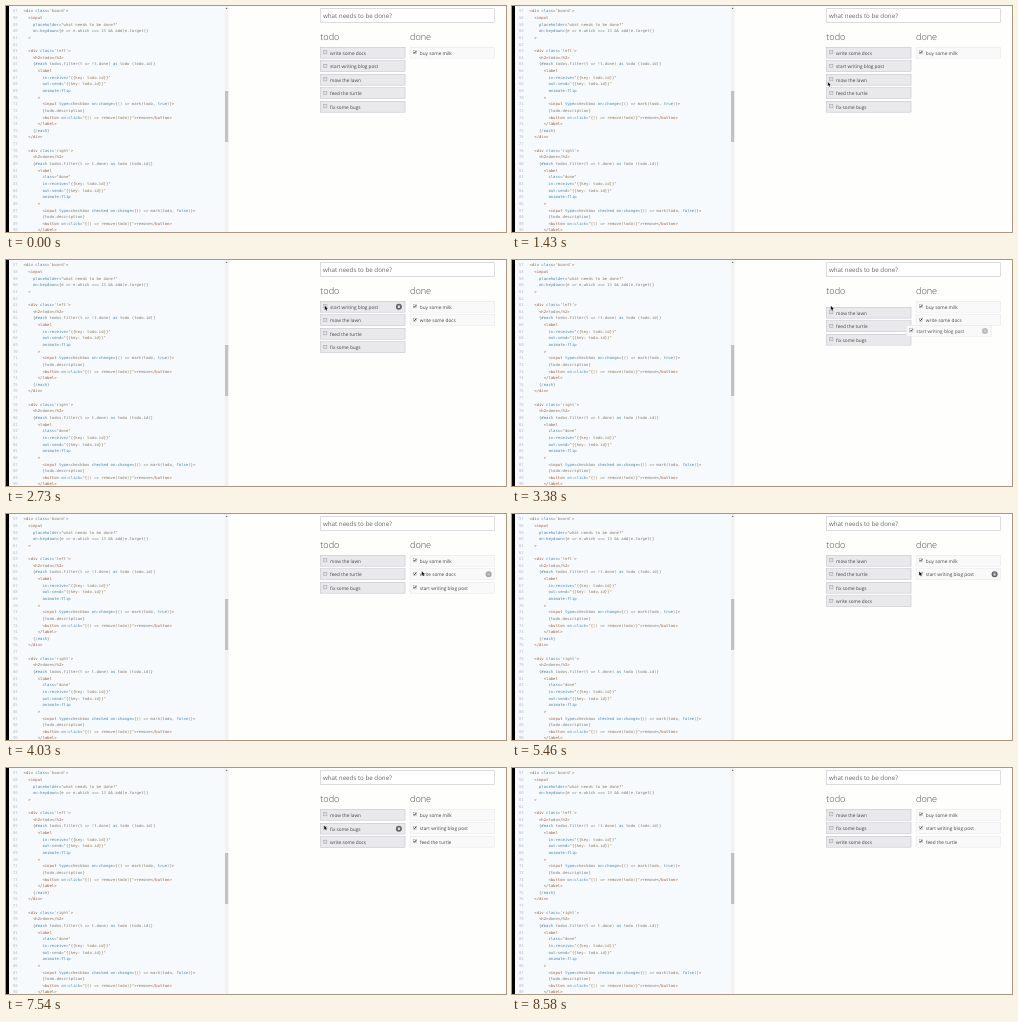
Animation, 500 px wide and 226 px high, one loop 9360 ms. Source, as an HTML page with a canvas:

```html
<!DOCTYPE html>
<html lang="en">
<head>
<meta charset="utf-8">
<title>Todo transitions</title>
<style>
html, body { margin: 0; width: 100%; height: 100%; overflow: hidden; background: #fefefd; }
canvas { display: block; width: 500px; height: 226px; }
</style>
</head>
<body>
<canvas id="stage"></canvas>
<script>
const W = 500, H = 226, LOOP = 9360;
const FLIP = 760, FADE = 345;
const canvas = document.getElementById('stage');
const ctx = canvas.getContext('2d');
const dpr = window.devicePixelRatio || 1;
canvas.width = W * dpr;
canvas.height = H * dpr;
ctx.scale(dpr, dpr);
ctx.textBaseline = 'alphabetic';
ctx.textRendering = 'geometricPrecision';

const SANS = '"Open Sans", "Noto Sans", sans-serif';
const MONO = '"DejaVu Sans Mono", "Noto Sans Mono", monospace';

const code = `<div class='board'>
  <input
    placeholder="what needs to be done?"
    on:keydown={e => e.which === 13 && add(e.target)}
  >

  <div class='left'>
    <h2>todo</h2>
    {#each todos.filter(t => !t.done) as todo (todo.id)}
      <label
        in:receive="{{key: todo.id}}"
        out:send="{{key: todo.id}}"
        animate:flip
      >
        <input type=checkbox on:change={() => mark(todo, true)}>
        {todo.description}
        <button on:click="{() => remove(todo)}">remove</button>
      </label>
    {/each}
  </div>

  <div class='right'>
    <h2>done</h2>
    {#each todos.filter(t => t.done) as todo (todo.id)}
      <label
        class="done"
        in:receive="{{key: todo.id}}"
        out:send="{{key: todo.id}}"
        animate:flip
      >
        <input type=checkbox checked on:change={() => mark(todo, false)}>
        {todo.description}
        <button on:click="{() => remove(todo)}">remove</button>
      </label>`.split('\n');

const palette = {
  str: 'hsl(36,26%,46%)',
  op: 'hsl(40,7%,47%)',
  tag: 'hsl(19,45%,43%)',
  attr: 'hsl(204,42%,48%)',
  num: 'hsl(102,20%,50%)'
};
const token = /(?<str>"[^"]*"|'[^']*')|(?<op>=>|===|&&)|(?<tag><\/?\w+|>)|(?<attr>[\w:]+(?==)|animate:flip|[#\/]each|\b(?:as|true|false|checked)\b)|(?<num>\b13\b)|\w+|\s+|./g;

const names = {
  docs: 'write some docs',
  start: 'start writing blog post',
  mow: 'mow the lawn',
  feed: 'feed the turtle',
  fix: 'fix some bugs',
  milk: 'buy some milk'
};

// Each move sends one item to the end of the other list.
const moves = [
  { at: 2040, id: 'docs', to: 1 },
  { at: 3200, id: 'start', to: 1 },
  { at: 4750, id: 'docs', to: 0 },
  { at: 7020, id: 'feed', to: 1 }
];
const states = [[['docs', 'start', 'mow', 'feed', 'fix'], ['milk']]];
for (const m of moves) {
  const next = states[states.length - 1].map(list => list.filter(id => id !== m.id));
  next[m.to].push(m.id);
  states.push(next);
}

const hovers = [
  ['docs', 1620, 2040], ['start', 2380, 3200], ['mow', 3380, 3500],
  ['docs', 3930, 4750], ['start', 5000, 5860], ['feed', 6420, 7020],
  ['fix', 7300, 7900]
];

// Pointer tip: time, x, y
const path = [
  [780, 300, 236], [1650, 318.8, 45.8], [3420, 318.8, 45.8], [3980, 415.8, 57.2],
  [4250, 415.8, 57.2], [4560, 407.2, 57.4], [5700, 407.2, 57.4],
  [6450, 318.2, 57.4], [7800, 318.2, 57.4], [8500, 300, 236]
];

const clamp = v => Math.max(0, Math.min(1, v));
const mix = (a, b, p) => a + (b - a) * p;
const cubicOut = p => 1 - (1 - clamp(p)) ** 3;
const smooth = p => p * p * (3 - 2 * p);

function text(str, x, y, size, color, font = SANS, weight = 400) {
  ctx.font = `${weight} ${size}px ${font}`;
  ctx.fillStyle = color;
  ctx.fillText(str, x, y);
}

function rect(x, y, w, h, color) {
  ctx.fillStyle = color;
  ctx.fillRect(x, y, w, h);
}

function box(x, y, w, h, fill, line, width = 0.35) {
  rect(x, y, w, h, fill);
  ctx.strokeStyle = line;
  ctx.lineWidth = width;
  ctx.strokeRect(x + width / 2, y + width / 2, w - width, h - width);
}

function drawEditor() {
  rect(0, 0, 222.5, H, '#f6fafd');
  rect(0, 0, 3, H, '#000');
  const size = 3.92;
  ctx.font = `${size}px ${MONO}`;
  const step = ctx.measureText('m').width;
  code.forEach((line, i) => {
    const y = 6.3 + i * 6.64;
    text(57 + i, 7, y, size, '#b8bcc6', MONO);
    for (const m of line.matchAll(token)) {
      const kind = Object.keys(palette).find(k => m.groups[k]);
      text(m[0], 17.6 + m.index * step, y, size, palette[kind || 'op'], MONO);
    }
  });
  rect(218.7, 0, 3.8, H, '#f2f2f2');
  rect(219, 85, 3.2, 51, '#c3c1c1');
  ctx.fillStyle = '#666';
  ctx.beginPath();
  ctx.moveTo(219.6, 2.9);
  ctx.lineTo(220.6, 1.7);
  ctx.lineTo(221.6, 2.9);
  ctx.fill();
}

function drawButton(x, y, alpha) {
  if (alpha <= 0) return;
  ctx.save();
  ctx.globalAlpha *= alpha;
  ctx.fillStyle = '#656569';
  ctx.beginPath();
  ctx.arc(x, y, 3, 0, Math.PI * 2);
  ctx.fill();
  rect(x - 1, y - 0.8, 2, 2, '#e4e4e8');
  rect(x - 1.3, y - 1.5, 2.6, 0.4, '#e4e4e8');
  ctx.restore();
}

function drawCard(id, x, y, done, hover, alpha = 1) {
  ctx.save();
  ctx.globalAlpha = alpha;
  box(x, y, 85, 11.2, done ? 'hsl(240,8%,98%)' : 'hsl(240,8%,92%)',
    done ? 'hsl(240,8%,88%)' : 'hsl(240,8%,70%)');
  box(x + 3.3, y + 3.4, 3.6, 3.6, done ? '#fafafa' : '#dedee1', '#98989c', 0.4);
  if (done) {
    ctx.strokeStyle = '#333';
    ctx.lineWidth = 0.9;
    ctx.beginPath();
    ctx.moveTo(x + 3.9, y + 5.1);
    ctx.lineTo(x + 4.7, y + 6.1);
    ctx.lineTo(x + 6.3, y + 4);
    ctx.stroke();
  }
  text(names[id], x + 9.9, y + 7.5, 4.73, '#444');
  drawButton(x + 78.7, y + 5.7, hover);
  ctx.restore();
}

function place(state, id) {
  const col = state[0].includes(id) ? 0 : 1;
  return { x: 314.2 + col * 89.7, y: 41.1 + state[col].indexOf(id) * 13.5, col };
}

function hoverOf(id, t) {
  const h = hovers.find(([name, from, to]) => name === id && t >= from && t < to);
  return h ? clamp((t - h[1]) / 180) : 0;
}

function drawLists(t) {
  const n = moves.filter(m => t >= m.at).length;
  const move = moves[n - 1];
  const age = move ? t - move.at : FLIP;
  const now = states[n], before = states[Math.max(0, n - 1)];
  const sent = move && age < FADE ? move.id : null;

  for (const id of Object.keys(names)) {
    if (id === sent) continue;
    const a = place(before, id), b = place(now, id);
    const y = a.col === b.col ? mix(a.y, b.y, cubicOut(age / FLIP)) : b.y;
    drawCard(id, b.x, y, b.col === 1, hoverOf(id, t));
  }
  if (sent) {
    const a = place(before, sent), b = place(now, sent);
    const p = cubicOut(age / FADE);
    const x = mix(a.x, b.x, p), y = mix(a.y, b.y, p);
    drawCard(sent, x, y, a.col === 1, 0.45, 1 - p);
    drawCard(sent, x, y, b.col === 1, 0.45, p);
  }
}

function drawPointer(t) {
  const i = path.findIndex(k => k[0] > t);
  if (i < 1) return;
  const a = path[i - 1], b = path[i];
  const p = smooth((t - a[0]) / (b[0] - a[0]));
  ctx.save();
  ctx.translate(mix(a[1], b[1], p), mix(a[2], b[2], p));
  ctx.scale(0.88, 0.88);
  ctx.beginPath();
  for (const [x, y] of [[0, 0], [0, 4.8], [1.1, 3.8], [1.9, 5.5], [2.7, 5.1], [1.9, 3.5], [3.4, 3.4]]) {
    ctx.lineTo(x, y);
  }
  ctx.closePath();
  ctx.strokeStyle = '#fff';
  ctx.lineWidth = 0.7;
  ctx.stroke();
  ctx.fillStyle = '#111';
  ctx.fill();
  ctx.restore();
}

function draw(t) {
  rect(0, 0, W, H, '#fefefd');
  drawEditor();
  box(314.2, 2.5, 174.7, 14, '#fff', '#bcbcc0', 0.5);
  text('what needs to be done?', 317, 11.9, 6.2, '#666');
  text('todo', 314.3, 33.9, 9.1, '#444', SANS, 300);
  text('done', 404, 33.9, 9.1, '#444', SANS, 300);
  drawLists(t);
  drawPointer(t);
}

const begin = performance.now();
function tick() {
  draw((performance.now() - begin) % LOOP);
  requestAnimationFrame(tick);
}
tick();
</script>
</body>
</html>
```
